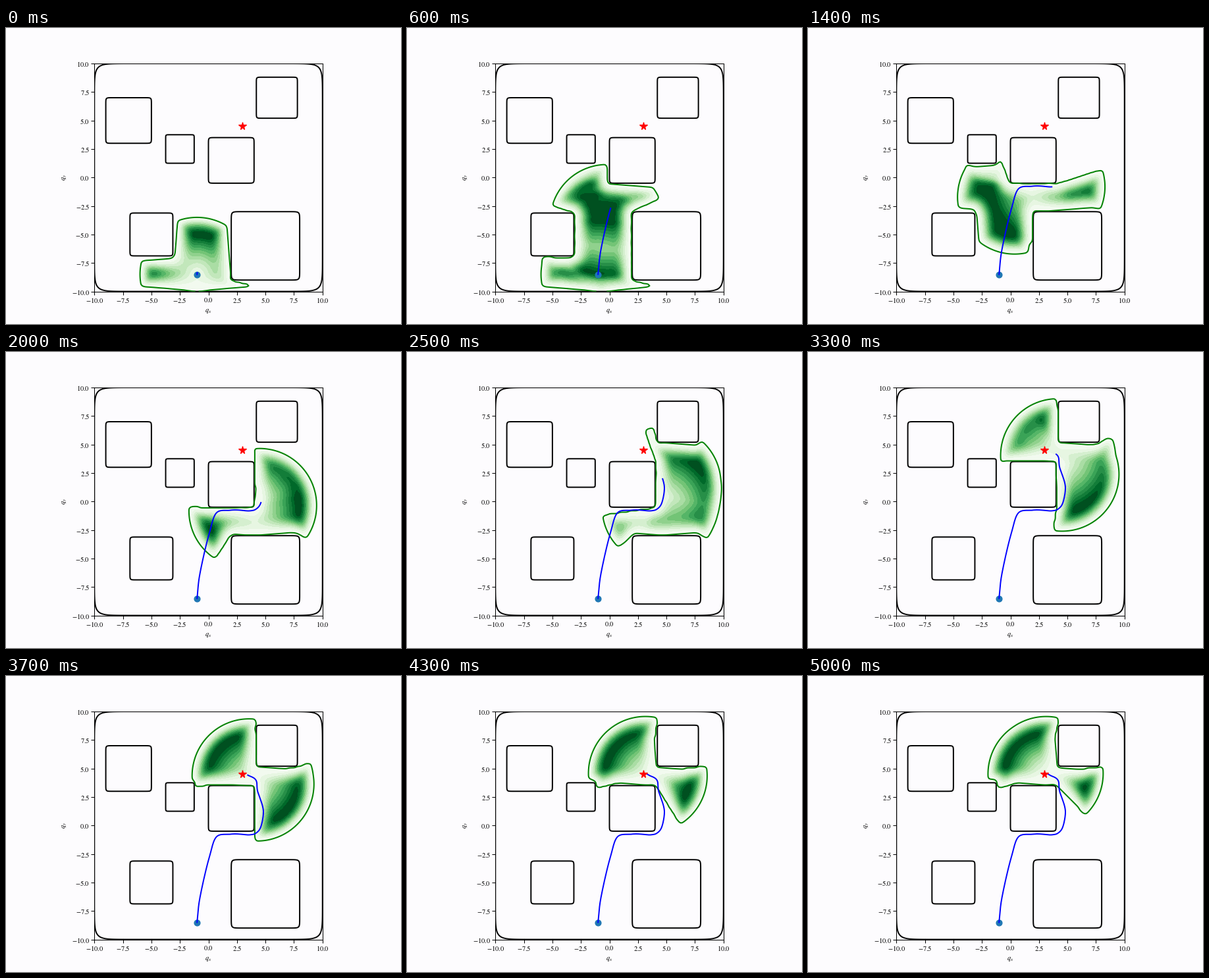
A matplotlib script that plays this animation: 600x450 px, repeating every 5100 ms.

```python
import numpy as np
import matplotlib.pyplot as plt
from matplotlib.animation import FuncAnimation

plt.rcParams.update({
    "font.family": "Liberation Serif",
    "mathtext.fontset": "stix",
    "font.size": 8,
})

FRAMES, INTERVAL = 51, 100
PAPER = "#fdfcfe"
SENSOR_RANGE = 5.0
MARGIN = 0.06
MEMORY = 7
START, GOAL = (-1, -8.5), (3, 4.5)

# obstacles: centre x, centre y, half width
BOXES = [(-7, 5, 2), (-2.5, 2.5, 1.25), (2, 1.5, 2),
         (6, 7, 1.8), (-5, -5, 1.88), (5, -6, 3)]

# key points of the robot path: step, x, y
PATH = np.array([
    (0, *START), (3, -.74, -6.3), (6, .1, -2.7), (8, .7, -1),
    (10, 1.9, -.77), (14, 3.62, -.82), (17, 4.2, -.65), (20, 4.6, -.1),
    (23, 4.82, 1.15), (28, 4.29, 3.1), (31, 4.22, 3.85),
    (37, 3.45, 4.42), (50, *GOAL),
])

AXIS = np.linspace(-10, 10, 161)
X, Y = np.meshgrid(AXIS, AXIS)


def position(t):
    """Robot position at step t, by cubic Hermite interpolation."""
    t = np.asarray(t, float)
    times = PATH[:, 0]
    i = np.clip(np.searchsorted(times, t, side="right") - 1, 0, len(times) - 2)
    step = times[i + 1] - times[i]
    u = (t - times[i]) / step
    coords = []
    for v in PATH[:, 1:].T:
        m = np.gradient(v, times)
        coords.append((1 + 2 * u) * (1 - u) ** 2 * v[i]
                      + u * (1 - u) ** 2 * step * m[i]
                      + u ** 2 * (3 - 2 * u) * v[i + 1]
                      + u ** 2 * (u - 1) * step * m[i + 1])
    return np.array(coords)


def narrow(reach):
    """Shortest reach among neighbouring rays: keeps off grazed walls."""
    return np.min([np.roll(reach, k) for k in range(-9, 10)], axis=0)


def scan(p):
    """Signed visibility margin and distance of every grid point from p."""
    angles = (np.arange(720) + 0.5) * np.pi / 360 - np.pi
    d = np.array([np.cos(angles), np.sin(angles)])
    p = p[:, None]
    walls = ((10 - MARGIN) * np.sign(d) - p) / d
    reach = np.minimum(SENSOR_RANGE, narrow(walls.min(axis=0)))
    for cx, cy, half in BOXES:
        c = np.array([[cx], [cy]])
        a = (c - half - MARGIN - p) / d
        b = (c + half + MARGIN - p) / d
        near = np.minimum(a, b).max(axis=0)
        far = np.maximum(a, b).min(axis=0)
        hit = (near < far) & (far > 0)
        wall = narrow(np.where(hit, near, np.inf))
        reach = np.where(hit, np.minimum(reach, wall), reach)
    dx, dy = X - p[0], Y - p[1]
    r = np.hypot(dx, dy)
    limit = np.interp(np.arctan2(dy, dx), angles, reach, period=2 * np.pi)
    return np.clip(limit - r, -0.3, 0.3), r


def blur(z, times=1):
    kernel = np.array([1, 4, 6, 4, 1]) / 16
    for _ in range(times):
        for axis in (0, 1):
            z = np.apply_along_axis(np.convolve, axis, z, kernel, mode="same")
    return z


def shade(inside, far, outline):
    """Fill value: grows with clearance and with distance to the scans."""
    pts = np.column_stack([X[inside], Y[inside]])
    gap = pts[:, None, :] - outline[None, :, :]
    clear = np.sqrt((gap ** 2).sum(axis=2).min(axis=1))
    depth = np.clip((clear - 0.2) / 1.2, 0, 1) ** 1.2
    value = np.zeros_like(X)
    value[inside] = depth * (far[inside] + 0.8) ** 1.8
    value = blur(value, 3)
    return value / value.max()


def draw_box(cx, cy, half):
    """Superellipse: a square with slightly rounded corners."""
    a = np.linspace(0, 2 * np.pi, 800, endpoint=False)
    x, y = (half * np.sign(f) * np.abs(f) ** 0.1 for f in (np.cos(a), np.sin(a)))
    ax.fill(cx + x, cy + y, fill=False, edgecolor="black", lw=1.5, zorder=2)


fig, ax = plt.subplots(figsize=(6.4, 4.8), dpi=93.75, facecolor=PAPER)
ax.set_facecolor(PAPER)
ax.set_aspect("equal")
ax.set(xlim=(-10, 10), ylim=(-10, 10), xlabel="$q_x$", ylabel="$q_y$")
ax.tick_params(pad=2)
for axis in (ax.xaxis, ax.yaxis):
    axis.set_ticks(np.arange(-10, 10.1, 2.5))
    axis.set_major_formatter("${x:.1f}$")

for box in BOXES + [(0, 0, 10)]:
    draw_box(*box)
ax.scatter(*START, s=46, color="tab:blue", zorder=3)
trail, = ax.plot([], [], color="blue", lw=1.5, zorder=4)
ax.plot(*GOAL, "*", color="red", ms=9, zorder=5)

SCANS = [scan(position(n)) for n in range(FRAMES)]
region = []


def clear_region():
    while region:
        region.pop().remove()


def reset():
    clear_region()
    trail.set_data([], [])
    return [trail]


def draw(n):
    clear_region()
    recent = SCANS[max(0, n - MEMORY):max(1, n)]
    edge = blur(np.max([m for m, _ in recent], axis=0))
    far = np.max([np.where(m > 0, r, 0) for m, r in recent], axis=0)
    line = ax.contour(X, Y, edge, levels=[0], colors="green",
                      linewidths=1.5, zorder=2.5)
    value = shade(edge > 0, far, np.concatenate(line.allsegs[0]))
    fill = ax.contourf(X, Y, np.ma.masked_less(value, 0.003),
                       levels=np.linspace(0, 1, 14), cmap="Greens", zorder=1)
    region.extend([line, fill])
    end = max(n, 0.2)
    trail.set_data(*position(np.linspace(0, end, 6 * n + 2)))
    return [trail]


anim = FuncAnimation(fig, draw, frames=FRAMES, init_func=reset,
                     interval=INTERVAL, repeat=True, repeat_delay=0)
plt.show()
```
